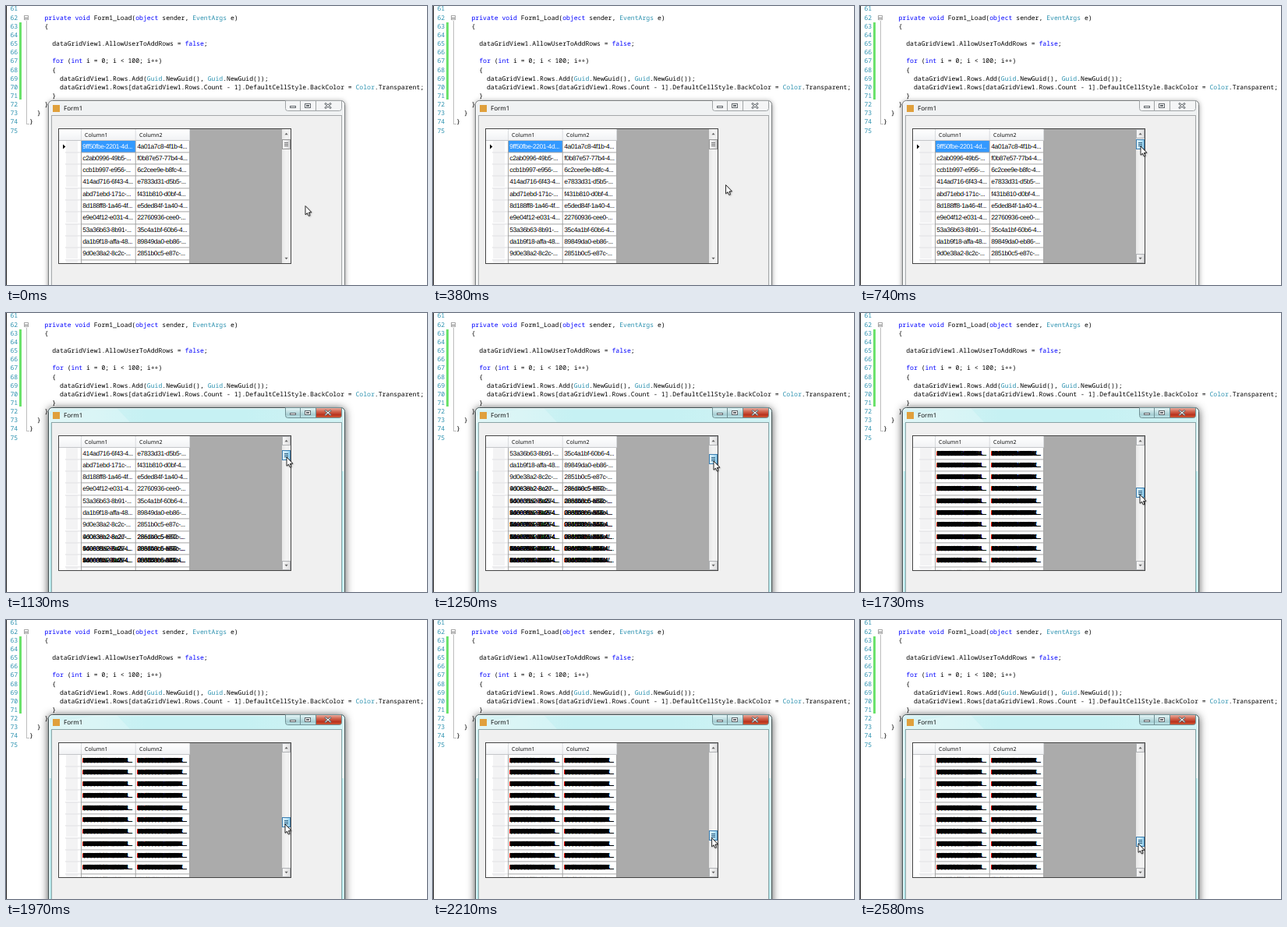
An HTML page with a canvas for the animation above (2640 ms loop, 540 by 358 pixels).

```html
<!DOCTYPE html>
<html lang="en">
<head>
<meta charset="utf-8">
<title>Grid scrolling</title>
<style>
html, body { margin: 0; width: 540px; height: 358px; overflow: hidden; background: #fff; }
canvas { display: block; }
</style>
</head>
<body>
<canvas id="stage" width="540" height="358"></canvas>
<script>
const LOOP = 2640;
const CODE_FONT = '8.12px "Noto Sans Mono", monospace';
const CELL_FONT = '8.4px "Liberation Sans", Arial, sans-serif';
const BLUE = '#0000ff', TEAL = '#2b91af', BLACK = '#000';
const ctx = document.getElementById('stage').getContext('2d');
ctx.textRendering = 'geometricPrecision';

// ---------- helpers ----------
function box(x, y, w, h, fill) {
  ctx.fillStyle = fill;
  ctx.fillRect(x, y, w, h);
}
function outline(x, y, w, h, color) {
  ctx.strokeStyle = color;
  ctx.lineWidth = 1;
  ctx.strokeRect(x + 0.5, y + 0.5, w - 1, h - 1);
}
function shape(points, fill, stroke) {
  ctx.beginPath();
  points.forEach(([x, y]) => ctx.lineTo(x, y));
  ctx.closePath();
  if (fill) { ctx.fillStyle = fill; ctx.fill(); }
  if (stroke) { ctx.strokeStyle = stroke; ctx.stroke(); }
}
function roundBox(x, y, w, h, radius) {
  ctx.beginPath();
  ctx.roundRect(x, y, w, h, radius);
}
function label(text, x, y, font, color = BLACK) {
  ctx.font = font;
  ctx.fillStyle = color;
  ctx.fillText(text, x, y);
}
function blend(x0, y0, x1, y1, ...colors) {
  const g = ctx.createLinearGradient(x0, y0, x1, y1);
  colors.forEach((c, i) => g.addColorStop(i / (colors.length - 1), c));
  return g;
}
function range(from, to, step = 60) {
  const out = [];
  for (let t = from; t <= to; t += step) out.push(t);
  return out;
}
function track(keys, t) {
  if (t <= keys[0][0]) return keys[0][1];
  for (let i = 1; i < keys.length; i++) {
    const [t0, a] = keys[i - 1], [t1, b] = keys[i];
    if (t <= t1) return a + (b - a) * (t - t0) / (t1 - t0);
  }
  return keys[keys.length - 1][1];
}

// ---------- timing ----------
const STEPS = [0, ...range(200, 740), 870, ...range(1070, 2270), ...range(2400, 2580)];
const THUMB = [[870, 177], [1070, 179], [1130, 182], [1250, 187], [1370, 194], [1490, 203],
  [1730, 230], [1970, 259], [2270, 281], [2400, 282], [2580, 284]];
const POINTER_X = [[1490, 360], [1970, 358], [2580, 357]];
const thumbAt = t => track(THUMB, t);
const rowAt = t => Math.round((thumbAt(t) - 177) / 1.49);

function pointerAt(t) {
  if (t >= 740) return [track(POINTER_X, t), thumbAt(t) + 3];
  const p = Math.max(0, (t - 140) / 600);
  const e = p * p * (3 - 2 * p);
  return [384 - 24 * e, 256.5 - 76.5 * e];
}

// ---------- code editor ----------
const CODE = [
  [0],
  [4, BLUE, 'private void ', BLACK, 'Form1_Load(', BLUE, 'object', BLACK, ' sender, ', TEAL, 'EventArgs', BLACK, ' e)'],
  [4, BLACK, '{'],
  [0],
  [6, BLACK, 'dataGridView1.AllowUserToAddRows = ', BLUE, 'false', BLACK, ';'],
  [0],
  [6, BLUE, 'for', BLACK, ' (', BLUE, 'int', BLACK, ' i = 0; i < 100; i++)'],
  [6, BLACK, '{'],
  [8, BLACK, 'dataGridView1.Rows.Add(', TEAL, 'Guid', BLACK, '.NewGuid(), ', TEAL, 'Guid', BLACK, '.NewGuid());'],
  [8, BLACK, 'dataGridView1.Rows[dataGridView1.Rows.Count - 1].DefaultCellStyle.BackColor = ', TEAL, 'Color', BLACK, '.Transparent;'],
  [6, BLACK, '}'],
  [4, BLACK, '}'],
  [2, BLACK, '}'],
  [0, BLACK, '}'],
  [0]
];

function drawEditor() {
  box(0, 0, 540, 358, '#fff');
  box(0, 0, 1, 358, '#222');
  box(17, 21, 3, 99, '#6ce26c');
  box(26, 19, 1, 133, '#bdbdbd');
  box(26, 151, 4, 1, '#bdbdbd');
  box(23, 12, 6, 6, '#fff');
  outline(23, 12, 6, 6, '#a5a5a5');
  box(24, 15, 4, 1, '#777');
  ctx.font = CODE_FONT;
  const charWidth = ctx.measureText('0').width;
  CODE.forEach(([indent, ...parts], i) => {
    const y = Math.round(6.4 + 11.16 * i);
    label(String(61 + i), 5.5, y, CODE_FONT, TEAL);
    let x = 30 + indent * charWidth;
    for (let k = 0; k < parts.length; k += 2) {
      label(parts[k + 1], x, y, CODE_FONT, parts[k]);
      x += parts[k + 1].length * charWidth;
    }
  });
}

// ---------- grid contents ----------
const GRID = { x: 97, y: 173, w: 139, h: 157 };
const FIRST = [
  '9ff50fbe-2201-4d 4a01a7c8-4f1b-4', 'c2ab0996-49b5- f0b87e57-77b4-4',
  'ccb1b997-e956- 6c2cee9e-b8fc-4', '414ad716-6f43-4 e7833d31-d5b5-',
  'abd71ebd-171c- f431b810-d0bf-4', '8d188ff8-1a46-4f e5ded84f-1a40-4',
  'e9e04f12-e031-4 22760936-cee0-', '53a36b63-8b91- 35c4a1bf-60b6-4',
  'da1b9f18-affa-48 89849da0-eb86-', '9d0e38a2-8c2c- 2851b0c5-e87c-',
  '46083eb2-8a27- 28ed48c5-f692-'
].map(s => s.split(' '));
const slotY = i => Math.floor(15.3 * i);

function newLayer() {
  const c = document.createElement('canvas');
  c.width = GRID.w;
  c.height = GRID.h;
  return c;
}
const live = newLayer(), ink = live.getContext('2d');
ink.font = CELL_FONT;
ink.letterSpacing = '-0.36px';
ink.textRendering = 'geometricPrecision';

let seed = 77;
function hex(n) {
  let s = '';
  while (n--) {
    seed = (seed * 1103515245 + 12345) % 2147483648;
    s += (seed >> 16 & 15).toString(16);
  }
  return s;
}
function shortGuid() {
  let s = `${hex(8)}-${hex(4)}-4${hex(3)}`;
  while (ink.measureText(s + '...').width > 64) s = s.slice(0, -1);
  return s;
}
const ROWS = Array.from({ length: 100 }, (_, i) => FIRST[i] || [shortGuid(), shortGuid()]);

// Subpixel-style text: one ink per colour channel, slightly offset.
function cellText(text, x, y) {
  ink.globalCompositeOperation = 'multiply';
  [['#0ff', 0.33], ['#f0f', 0], ['#ff0', -0.33]].forEach(([color, dx]) => {
    ink.fillStyle = color;
    ink.fillText(text, x + dx, y);
  });
  ink.globalCompositeOperation = 'source-over';
}
function paintRow(row, slot) {
  ROWS[row].forEach((text, col) => {
    const x = 1.3 + 70 * col, y = slotY(slot) + 10;
    if (row === 0 && col === 0) {
      ink.fillStyle = '#3399ff';
      ink.fillRect(0, 0, 69, 15);
      ink.fillStyle = '#fff';
      ink.fillText(text + '...', x, y);
    } else cellText(text + '...', x, y);
  });
}
// Rows move up; incoming rows are painted over whatever was there.
function scrollRows(top, count) {
  for (let i = 0; i + count < 10; i++) {
    ink.drawImage(live, 0, slotY(i + count), GRID.w, 15, 0, slotY(i), GRID.w, 15);
  }
  for (let i = 10 - count; i <= 10; i++) paintRow(top + i, i);
}

const layers = new Map();
ink.fillStyle = '#fff';
ink.fillRect(0, 0, GRID.w, GRID.h);
for (let i = 0; i <= 10; i++) paintRow(i, i);
let topRow = 0;
STEPS.forEach(t => {
  const goal = rowAt(t);
  while (topRow < goal) {
    const count = Math.min(topRow < 7 ? 1 : 2, goal - topRow);
    topRow += count;
    scrollRows(topRow, count);
  }
  if (!layers.has(goal)) {
    const copy = newLayer();
    copy.getContext('2d').drawImage(live, 0, 0);
    layers.set(goal, copy);
  }
});

// ---------- window ----------
function drawFrame(active) {
  ctx.save();
  ctx.shadowColor = active ? 'rgba(0,0,0,.75)' : 'rgba(0,0,0,.5)';
  ctx.shadowBlur = active ? 11 : 6;
  ctx.shadowOffsetY = 1;
  roundBox(54.5, 121.5, 380, 300, 5);
  ctx.fillStyle = active ? '#b9e9ec' : '#f0f2f3';
  ctx.fill();
  ctx.restore();
  if (active) {
    ctx.save();
    roundBox(54.5, 121.5, 380, 300, 5);
    ctx.clip();
    box(54, 122, 381, 19, blend(54, 0, 435, 0, '#d9f3f4', '#c6f1f3', '#c6f1f3', '#d2f3f4'));
    shape([[54, 141], [54, 132], [120, 122], [142, 122], [160, 141]], 'rgba(255,255,255,.2)');
    [54, 430].forEach(x => box(x, 141, 5, 62, blend(0, 141, 0, 203, '#cdf1f3', '#e6f6f6')));
    ctx.restore();
  }
  ctx.lineWidth = 1;
  roundBox(54.5, 121.5, 380, 300, 5);
  ctx.strokeStyle = active ? '#3f5052' : '#777b7d';
  ctx.stroke();
  roundBox(55.5, 122.5, 378, 300, 4);
  ctx.strokeStyle = 'rgba(255,255,255,.75)';
  ctx.stroke();
  box(59, 141, 371, 220, '#f0f0f0');
  outline(58, 140, 373, 240, active ? '#8aa3a5' : '#a4a7a9');
  box(60, 127, 9, 9, '#e0a03c');
  label('Form1', 74, 134, '8px "Open Sans", sans-serif');
}

function drawCaptionButtons(active) {
  const edge = active ? '#6f8f93' : '#a0a4a6';
  const corners = [0, 0, 3, 3];
  ctx.save();
  roundBox(358.5, 121.5, 72, 13, corners);
  ctx.clip();
  box(358, 122, 40, 13, active ? blend(0, 122, 0, 135, '#e3f5f6', '#c5e2e5', '#a5cdd2', '#c8eff2') : '#f4f5f6');
  box(397, 122, 34, 13, active ? blend(0, 122, 0, 135, '#e9aa9d', '#d26650', '#b9321c', '#d9673f') : '#f4f5f6');
  ctx.restore();
  roundBox(358.5, 121.5, 72, 13, corners);
  ctx.strokeStyle = edge;
  ctx.stroke();
  [377, 397].forEach(x => box(x, 122, 1, 12, edge));
  const glyph = '#60666b';
  box(364, 128, 8, 3, '#fff');
  outline(364, 128, 8, 3, glyph);
  box(383, 125, 8, 6, '#fff');
  outline(383, 125, 8, 6, glyph);
  outline(385, 127, 4, 2, glyph);
  ctx.lineCap = 'square';
  [[2.4, glyph], [1, '#fff']].forEach(([w, color]) => {
    ctx.lineWidth = w;
    ctx.strokeStyle = color;
    ctx.beginPath();
    ctx.moveTo(410, 125.5); ctx.lineTo(416, 130.5);
    ctx.moveTo(416, 125.5); ctx.lineTo(410, 130.5);
    ctx.stroke();
  });
  ctx.lineCap = 'butt';
}

function drawGrid(top) {
  const line = '#a6a6a6';
  box(67, 157, 299, 174, '#ababab');
  box(68, 158, 168, 172, '#fff');
  box(68, 158, 168, 14, blend(0, 158, 0, 172, '#ffffff', '#f8f9fa', '#f1f2f4'));
  [96, 165.7, 235].forEach(x => box(x, 158, 1, 14, '#d9dbde'));
  box(68, 172, 168, 1, '#c4c6c9');
  label('Column1', 101, 168, '7px "Open Sans", sans-serif');
  label('Column2', 171, 168, '7px "Open Sans", sans-serif');
  ctx.drawImage(layers.get(top), GRID.x, GRID.y);
  for (let i = 0; i <= 10; i++) {
    const y = GRID.y + slotY(i);
    box(77, y, 15, Math.min(14, 330 - y), '#f3f3f4');
    if (i) {
      box(76, y - 0.6, 20, 1, '#dcdddf');
      box(96, y - 0.6, 140, 1, line);
    }
  }
  [96, 165.7, 235].forEach(x => box(x, 173, 1, 157, line));
  if (top === 0) shape([[73, 177.5], [76.3, 180.5], [73, 183.5]], BLACK);
}

function drawScrollbar(y, hovered, hot) {
  box(354, 158, 11, 172, blend(354, 0, 365, 0, '#e8e8e8', '#f3f3f3', '#f0f0f0'));
  [[158, -1], [318, 1]].forEach(([by, dir]) => {
    if (hovered) {
      box(354, by, 11, 12, blend(354, 0, 365, 0, '#fafafa', '#dcdcdd'));
      outline(354, by, 11, 12, '#b0b2b5');
    }
    const cy = by + 6;
    shape([[357.5, cy - dir * 1.2], [361.7, cy - dir * 1.2], [359.6, cy + dir * 1.2]], '#666');
  });
  const ty = Math.round(y - 6.5);
  box(354, ty, 11, 13, hot ? blend(354, 0, 365, 0, '#e8f6fd', '#c0e5f8', '#8acbea')
                           : blend(354, 0, 365, 0, '#f8f8f8', '#e6e6e7', '#cfcfd1'));
  outline(354, ty, 11, 13, hot ? '#3c7fb1' : '#979797');
  [4, 6, 8].forEach(d => box(357, ty + d, 5, 1, hot ? '#2b5f80' : '#777'));
  outline(67, 157, 299, 174, '#444');
}

function drawPointer(x, y) {
  ctx.save();
  ctx.translate(x, y);
  ctx.shadowColor = 'rgba(0,0,0,.45)';
  ctx.shadowBlur = 2;
  ctx.shadowOffsetX = ctx.shadowOffsetY = 1;
  ctx.lineWidth = 0.9;
  const arrow = [[0, 0], [0, 11.3], [2.5, 9.1], [4.2, 12.9], [6, 12.1], [4.4, 8.4], [7.9, 8.2]];
  shape(arrow, '#fff');
  ctx.shadowColor = 'transparent';
  shape(arrow, null, '#111');
  ctx.restore();
}

function render(time) {
  const t = STEPS.filter(s => s <= time).pop();
  const active = t >= 870;
  const [px, py] = pointerAt(t);
  drawEditor();
  drawFrame(active);
  drawCaptionButtons(active);
  drawGrid(rowAt(t));
  drawScrollbar(thumbAt(t), px < 365, t >= 740);
  drawPointer(px, py);
}

let start;
function tick(now) {
  if (start === undefined) start = now;
  render(Math.max(0, now - start) % LOOP);
  requestAnimationFrame(tick);
}
render(0);
requestAnimationFrame(tick);
</script>
</body>
</html>
```
